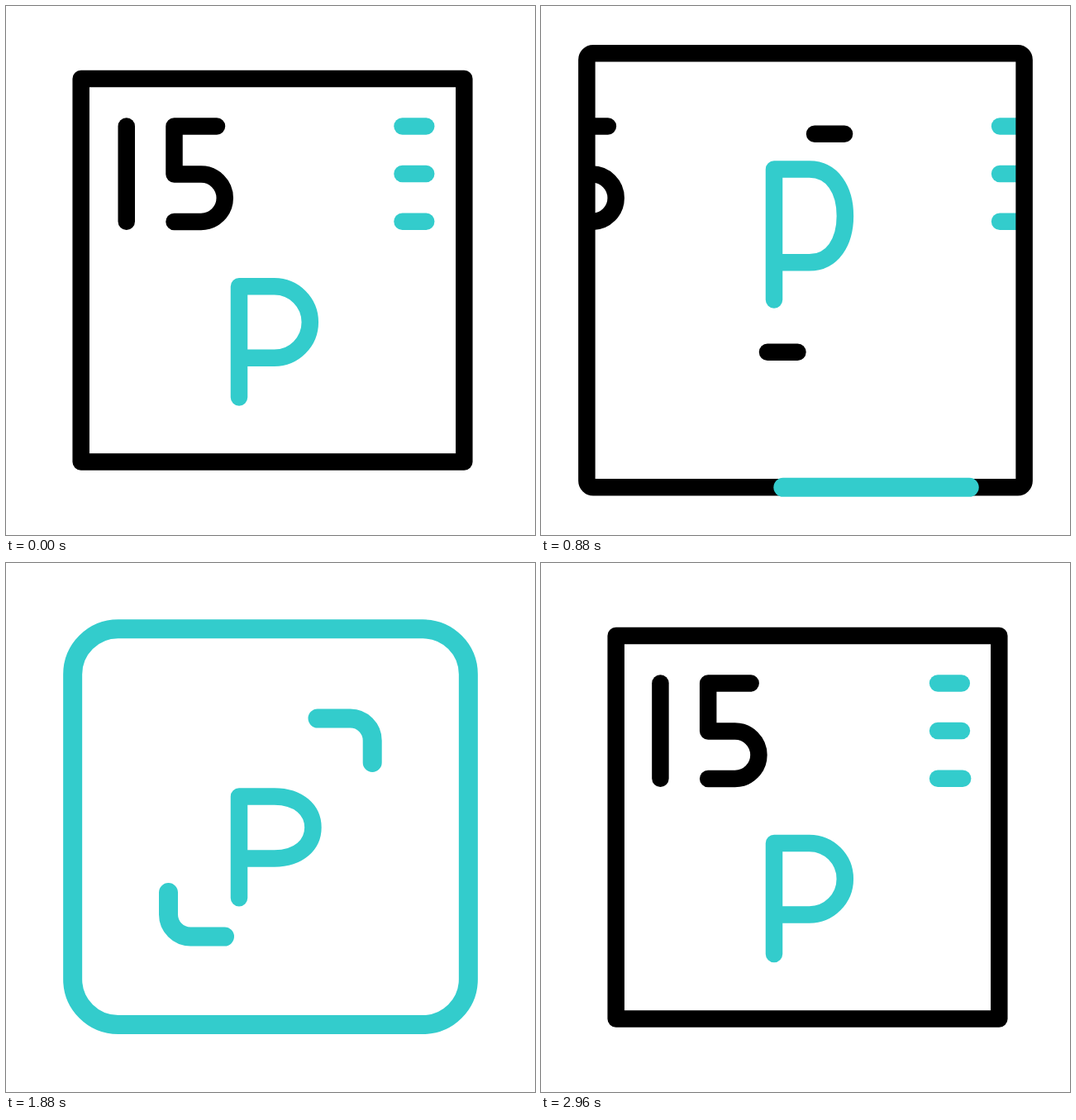
Write an HTML page that moves like this. It is 640 by 640 pixels and loops after 3 s.

```html
<!DOCTYPE html>
<html lang="en">
<head>
<meta charset="utf-8">
<title>Element 15</title>
<style>
  html, body { margin: 0; width: 100%; height: 100%; overflow: hidden; background: #fff; }
  svg { display: block; width: 100%; height: 100%; }
  path { fill: none; stroke: #000; stroke-width: 20.5; stroke-linecap: round; stroke-linejoin: round; }
  .teal { stroke: #3cc; }
  .wide { stroke-width: 23; }
</style>
</head>
<body>
<svg viewBox="0 0 640 640">
  <clipPath id="inside"><path class="boxShape"/></clipPath>
  <g clip-path="url(#inside)">
    <g id="number">
      <path d="M145.75 145.5V260.75"/>
      <path d="M255 145.5H203.5V203.5H236A28.75 28.75 0 0 1 236 261H203.5"/>
    </g>
    <path class="teal bar"/>
    <path class="teal bar"/>
    <path class="teal bar"/>
  </g>
  <path class="boxShape"/>
  <path id="boxTrace" class="boxShape teal wide" pathLength="1"/>
  <path class="bracket" pathLength="1"/>
  <path class="bracket" pathLength="1"/>
  <path class="bracketTrace teal wide" pathLength="1"/>
  <path class="bracketTrace teal wide" pathLength="1"/>
  <path id="letter" class="teal"/>
</svg>
<script>
const LOOP = 3000, STEP = 40;
const byId = id => document.getElementById(id);
const all = selector => [...document.querySelectorAll(selector)];
const boxes = all('.boxShape'), bars = all('.bar');
const brackets = all('.bracket'), traces = all('.bracketTrace');

let now = 0;

// Smooth progress from 0 to 1 between two times.
function ease(start, end) {
  const x = Math.min(1, Math.max(0, (now - start) / (end - start)));
  return x * x * (3 - 2 * x);
}

// Shows the part of a unit-length path between two positions; closed paths wrap around.
function trim(path, from, to, closed) {
  const length = to - from;
  path.style.display = length > 0.002 ? '' : 'none';
  path.setAttribute('stroke-dasharray', length > 0.999 ? 'none' : `${length} ${closed ? 1 - length : 2}`);
  path.setAttribute('stroke-dashoffset', -from);
}

// Clockwise rounded box that begins in the middle of its bottom right corner.
function boxPath(cx, cy, w, h, r) {
  const left = cx - w, right = cx + w, top = cy - h, bottom = cy + h;
  const cut = r * (1 - Math.SQRT1_2);
  const arc = (x, y) => r > 0.01 ? `A${r} ${r} 0 0 1 ${x} ${y}` : `L${x} ${y}`;
  return `M${right - cut} ${bottom - cut}${arc(right - r, bottom)}` +
    `H${left + r}${arc(left, bottom - r)}V${top + r}${arc(left + r, top)}` +
    `H${right - r}${arc(right, top + r)}V${bottom - r}${arc(right - cut, bottom - cut)}Z`;
}

function drawBox() {
  const grow = ease(120, 560), shrink = ease(747, 1310);
  const swell = ease(1540, 2080), settle = ease(2200, 2800);
  const inner = 21.5 * swell - 14.2 * settle;
  const w = 231.8 + 39.4 * grow - 46.7 * shrink + inner;
  const h = 231.8 + 37 * grow - 44.3 * shrink + inner;
  const cx = 322.5 - 2.5 * (grow - settle);
  const cy = 319.8 - 0.6 * (shrink - settle);
  const d = boxPath(cx, cy, w, h, 55 * (shrink - settle));
  boxes.forEach(box => box.setAttribute('d', d));
  const turn = 0.38 * ease(430, 3000);
  trim(byId('boxTrace'), turn + ease(1980, 2520), turn + ease(770, 1310), true);
}

function drawContents() {
  const slide = ease(420, 1110) - ease(2310, 2990);
  byId('number').setAttribute('transform', `translate(${-235 * slide} 0)`);
  bars.forEach((bar, i) => {
    const out = 160 + 92 * i, back = 2340 + 37 * i;
    const length = 28.7 + 60 * (ease(out, out + 600) - ease(back, back + 600));
    bar.setAttribute('d', `M${479.5 + 102 * slide} ${145.4 + 57.7 * i}h${length}`);
  });
}

// A bent corner stroke; side -1 gives the same shape turned by half a circle.
function bracketPath(x, y, run, side) {
  const r = 26.7 * side;
  return `M${x} ${y}h${run * side}a26.7 26.7 0 0 1 ${r} ${r}v${r}`;
}

function drawBrackets() {
  const extra = 55 * (1 - ease(700, 1400));
  const lift = 33.3 * (1 - ease(880, 1650));
  const shapes = [
    bracketPath(377 - extra, 188 - lift, 39.5 + extra, 1),
    bracketPath(264.5 + extra, 452 - lift, 41.3 + extra, -1)
  ];
  const erased = ease(2190, 2720), traced = ease(920, 1707);
  const drawn = traced < 1 ? ease(709, 1253) : 0;
  shapes.forEach((d, i) => {
    brackets[i].setAttribute('d', d);
    traces[i].setAttribute('d', d);
    trim(brackets[i], 0, drawn);
    trim(traces[i], erased, traced);
  });
}

function drawLetter() {
  const rise = ease(340, 850), fall = ease(870, 1430);
  const lift = ease(1640, 2180), drop = ease(2380, 2985);
  const stretch = ease(280, 720), squash = ease(840, 1380);
  const top = 339.3 - 141.8 * rise + 104.5 * fall - 47 * lift + 84.3 * drop;
  const bowl = 86.5 + 27 * stretch - 46.5 * squash + 19.5 * lift;
  const mid = top + bowl / 2, base = top + bowl, foot = base + 47.7 - 2.5 * (rise - fall);
  const bend = 324.7, side = 367.8 + 6.2 * (squash - lift);
  const roundness = 0.552 + 0.1 * stretch + 0.04 * squash - 0.14 * lift;
  const hx = bend + (side - bend) * roundness, hy = bowl * 0.276;
  byId('letter').setAttribute('d',
    `M282 ${foot}V${top}H${bend}C${hx} ${top} ${side} ${mid - hy} ${side} ${mid}` +
    `S${hx} ${base} ${bend} ${base}H282`);
}

function frame() {
  now = Math.floor(performance.now() % LOOP / STEP) * STEP;
  drawBox();
  drawContents();
  drawBrackets();
  drawLetter();
  requestAnimationFrame(frame);
}
frame();
</script>
</body>
</html>
```
